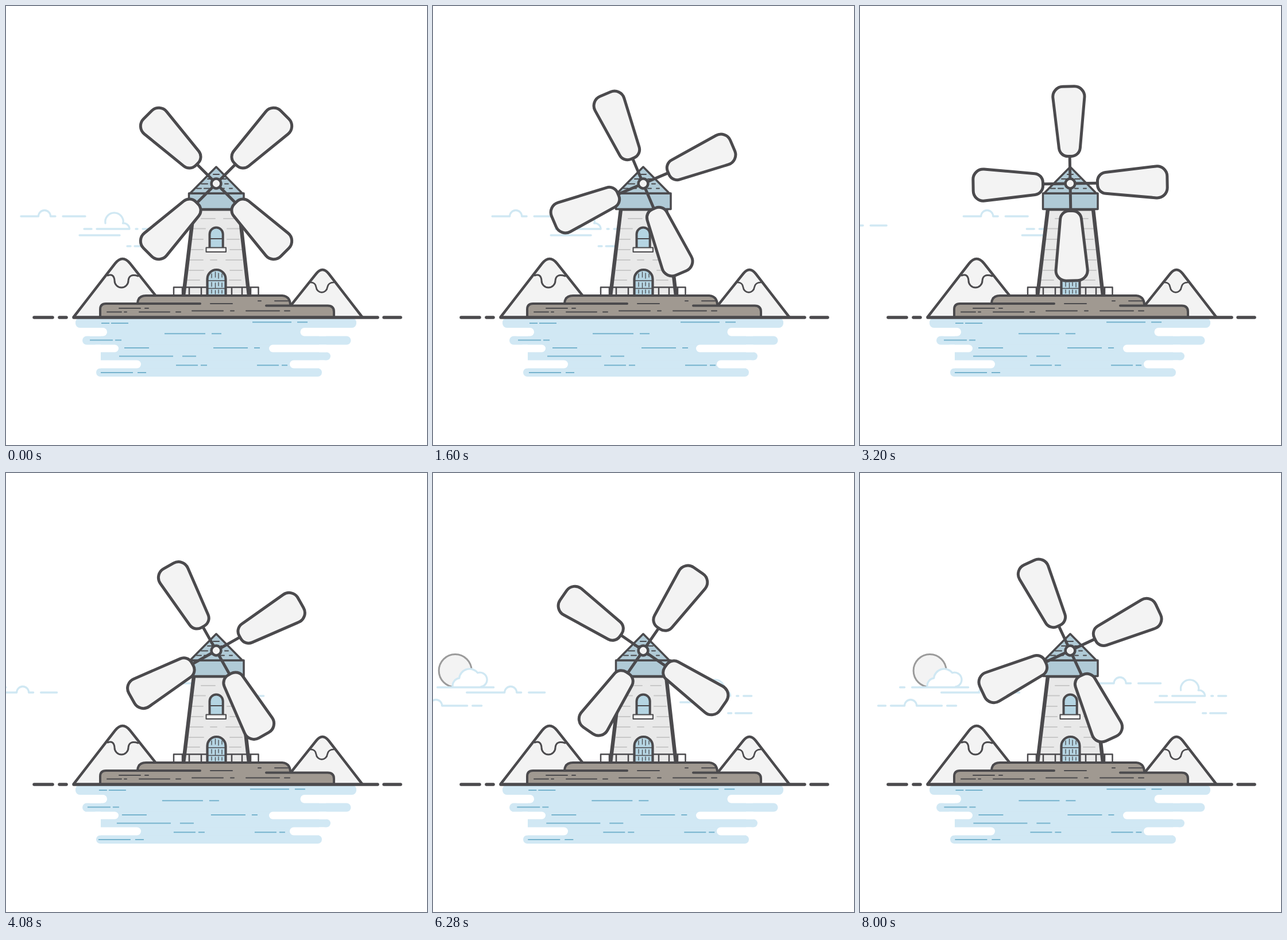
These frames come from a looping animation (733x764 px, 8040 ms). An HTML page:

```html
<!DOCTYPE html>
<html lang="en">
<head>
<meta charset="utf-8">
<title>Windmill island</title>
<style>
html, body { margin: 0; height: 100%; overflow: hidden; background: #fff; }
svg { display: block; width: 100%; height: 100%; }
path, circle, rect { fill: none; }
.ink { stroke: #4b4a4d; stroke-linecap: round; stroke-linejoin: round; }
.pale { fill: #f3f3f3; }
.slate { fill: #b0cad6; }
.glass { fill: #b5d5e3; }
.white { fill: #fff; }
.sea rect { fill: #d1e8f4; }
.sea .gap { fill: #fff; }
.cloud { stroke: #d0e8f3; stroke-width: 3.3; stroke-linecap: round; stroke-linejoin: round; }
</style>
</head>
<body>
<svg viewBox="0 0 733 764">
  <g id="sky" class="cloud">
    <path d="M26 366H56.5A10.5 10.5 0 0 1 77.5 366H86M99 366H138"/>
    <path d="M136 388H149M158 388H215A10.5 10.5 0 0 0 203.5 378M173 378A15.7 15.7 0 1 1 204 378M226 388H229M238 388H252"/>
    <path d="M128 399H198M211 418H217M224 418H252"/>
    <circle cx="-264" cy="344" r="28.5" class="pale" stroke="#9b9b9b" stroke-width="3"/>
    <path class="white" d="M-268.5 372A13.5 13.5 0 0 1 -257 357A18 18 0 0 1 -225 347.8A12.5 12.5 0 1 1 -219 372"/>
    <path d="M-316 373H-308M-295 373H-197"/>
    <path d="M-244 382H-178A10.5 10.5 0 0 1 -157 382H-149M-136 382H-108"/>
    <path d="M-354 405H-341M-332 405H-308A10.5 10.5 0 0 1 -287 405H-243M-234 405H-218"/>
  </g>

  <g class="ink" stroke-width="4.5">
    <path class="pale" d="M118 541L190 448Q203 432 216 448L290 541"/>
    <path class="pale" d="M480 541L540 466Q551 452 562 466L620 541"/>
    <path stroke-width="3" d="M177 469Q188 465 189 478A12 12 0 0 0 213 478Q214 465 230 470"/>
    <path stroke-width="2.7" d="M530 481Q539 481 540 489.5A9.8 9.8 0 0 0 559.5 489.5Q561 481 571 481"/>
  </g>

  <g class="sea">
    <rect x="165" y="550" width="380" height="88"/>
    <rect x="121" y="543" width="489" height="17" rx="7.5"/>
    <rect x="133" y="574.5" width="467.5" height="15" rx="7.5"/>
    <rect x="172" y="602.5" width="393" height="14" rx="7"/>
    <rect x="157" y="630.5" width="393" height="14.5" rx="7.2"/>
    <rect class="gap" x="140" y="560" width="36" height="14.5" rx="7.2"/>
    <rect class="gap" x="150" y="589.5" width="46" height="13" rx="6.5"/>
    <rect class="gap" x="155" y="616.5" width="80" height="14" rx="7"/>
    <rect class="gap" x="512.5" y="560" width="50" height="14.5" rx="7.2"/>
    <rect class="gap" x="458" y="589.5" width="105" height="13" rx="6.5"/>
    <rect class="gap" x="494" y="616.5" width="66" height="14" rx="7"/>
  </g>
  <path id="ripples" stroke="#76b3cd" stroke-width="2" d="M166 552H180M183 552H213M429 550.3H497M507 550.3H525
    M276 570.3H347M358 570.3H375M146 581.5H186M190 581.5H201M206 595H249M361 595H421M432 595H442
    M197 609.6H291M307 609.6H331M296 625.2H334M339 625.2H350M437 625.2H475M480 625.2H490M165 638H221M229 638H244"/>

  <g class="ink" stroke-width="6.5" stroke-linecap="butt">
    <path fill="#e9e9e9" style="fill:#e9e9e9;stroke:none" d="M327 354H406L423 504H309Z"/>
    <path style="stroke:#c8c8c8;stroke-width:2" d="M340 370H364M379 370H397M326 387.5H347M385 387.5H406M324 406H343M385 406H406
      M323 424H343M390 424H410M319 442H343M356 442H367M383 442H411M319 460H344M390 460H411M316 477H337M389 477H409"/>
    <path style="stroke-linecap:butt" d="M327 354L309 504M406 354L423 504"/>
    <g stroke-width="2.5">
      <path d="M292 503V489.5H350M383 489.5H439.5V503M307 489.5V503M319 489.5V503M340 489.5V503M393 489.5V503M411 489.5V503M426 489.5V503"/>
    </g>
    <path class="glass" stroke-width="4.2" d="M350.5 503V475A16 16 0 0 1 382.5 475V503"/>
    <path stroke-width="1.3" d="M352 478H381M352 491.5H381M358 466V473M364.5 463V472M370 465V474M376 466V472M358 481V488M364.5 482V490M370 481V487M376 482V489M358 494V500M364.5 495V501M370 494V500M376 495V500"/>
    <path class="glass" stroke-width="4" d="M354.5 420V397A11.6 11.6 0 0 1 377.7 397V420"/>
    <path stroke-width="2" d="M355 405H377"/>
    <rect class="pale" stroke-width="2" x="348.5" y="420.5" width="34.5" height="7.5"/>
    <rect class="slate" stroke-width="3.5" x="318.5" y="326" width="95.5" height="27.5"/>
    <path stroke-width="4" d="M328 354.5H406"/>
    <path class="slate" stroke-width="3.5" d="M366 280L411.5 326H320.5Z"/>
    <path stroke-width="2" d="M361 293H371M351 301H361M374 301H383M340 309.5H351M381 309.5H387M332 317.5H340M345 317.5H354M374 317.5H380M389 317.5H394"/>
  </g>

  <g class="ink" stroke-width="4">
    <path style="fill:#a09991;stroke:none" d="M164 542V528Q164 518 174 518H229Q230 504 244 504H482Q494 505 496 521.5H560Q571 521.5 571 532V542Z"/>
    <path d="M164 542V528Q164 518 174 518H338M229 517Q230 504 244 504H481Q494 505 495 519M453 521.5H560Q571 521.5 571 532V542"/>
    <path stroke-width="2" d="M197 526H234M242 526H248M176 532.5H201M206 532.5H210M232 532.5H285M296 532.5H304M356 518H394
      M324 530.5H378M391 530.5H397M418 530.5H476M485 530.5H494M439 513.3H444M468 513.3H492"/>
    <path stroke-width="5.5" d="M49 542H81M93 542H105M118 542H647M658 542H687"/>
  </g>

  <g id="sails" class="ink" stroke-width="5"></g>
  <circle class="ink pale" stroke-width="4.5" cx="366" cy="309" r="8.4"/>
</svg>
<script>
const LOOP = 8040, STEP = 40;
const byId = id => document.getElementById(id);
const sky = byId('sky'), ripples = byId('ripples'), sails = byId('sails');

const sail = 'M-9.9-169H9.9A17.7 17.7 0 0 1 27.5-149.5L18.4-61.4A15.5 15.5 0 0 1 3-47.5H-3' +
  'A15.5 15.5 0 0 1-18.4-61.4L-27.5-149.5A17.7 17.7 0 0 1-9.9-169Z';
sails.innerHTML = [0, 90, 180, 270].map(a =>
  `<g transform="rotate(${a})"><path d="M0 0V-47"/><path class="pale" d="${sail}"/></g>`).join('');

// Water drift: [time, offset] with soft easing between points
const drift = [[0, 0], [840, -.4], [2320, 4.2], [4080, -4.1], [5280, -.8], [6280, .3], [8040, .4]];
function driftAt(t) {
  const i = drift.findIndex(p => p[0] > t);
  const [t0, a] = drift[i - 1], [t1, b] = drift[i];
  const u = (t - t0) / (t1 - t0);
  return a + (b - a) * u * u * (3 - 2 * u);
}

const start = performance.now();
function draw() {
  const t = Math.floor((performance.now() - start) % LOOP / STEP) * STEP;
  sky.setAttribute('transform', `translate(${t * .0482})`);
  ripples.setAttribute('transform', `translate(${driftAt(t)})`);
  sails.setAttribute('transform', `translate(366 309) rotate(${45 + t * .07})`);
  requestAnimationFrame(draw);
}
draw();
</script>
</body>
</html>
```
